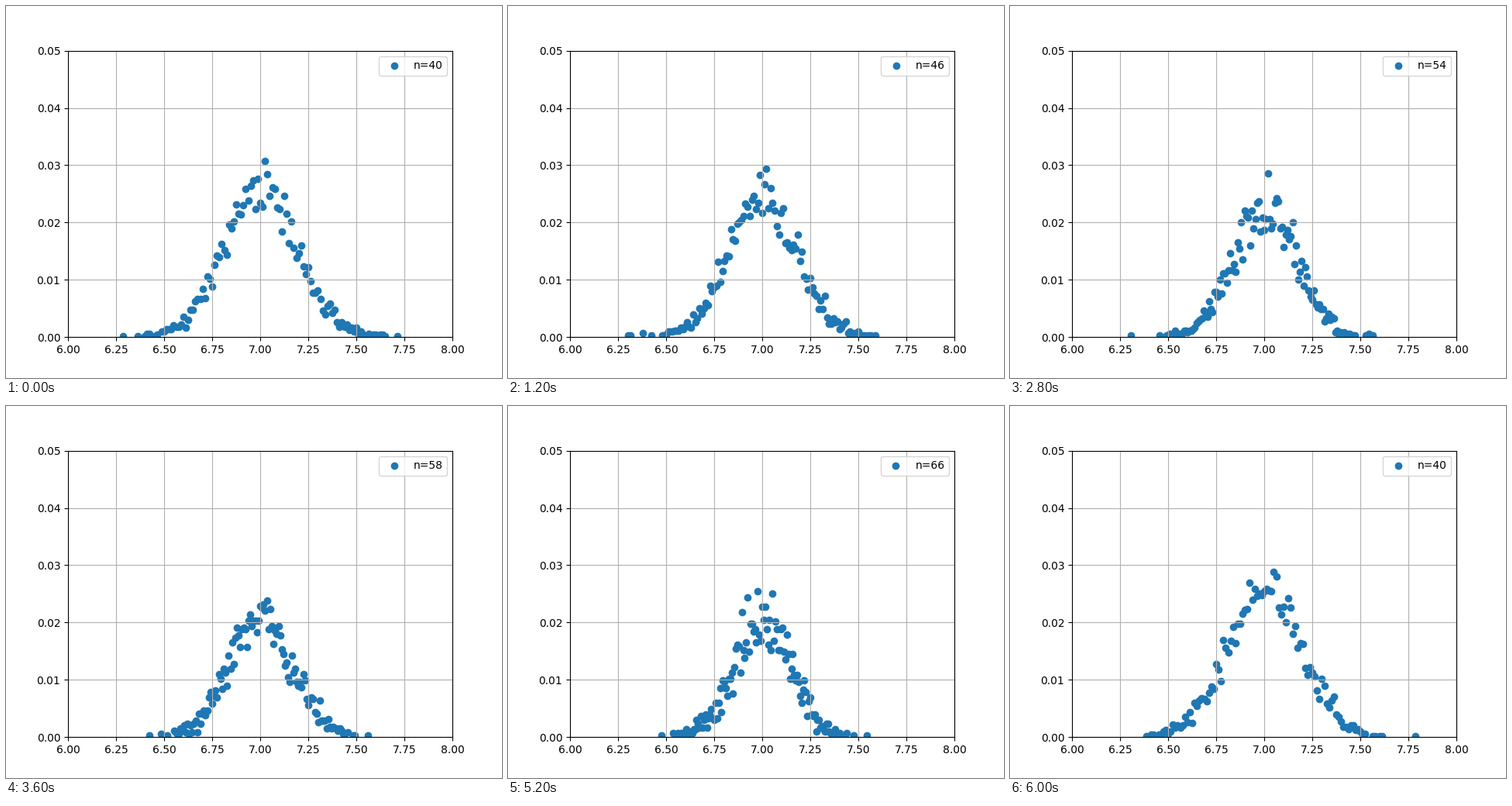
Recreate the animation shown at these times as a matplotlib script. Size 640 px wide and 480 px high, loop 6200 ms.

```python
import numpy as np
import matplotlib.pyplot as plt
from matplotlib.animation import FuncAnimation

FIRST_N, STEPS = 40, 30          # n runs 40..69, then starts over
FRAMES, INTERVAL = 31, 200
ROLLS = 200_000                  # pairs of dice shared out among the samples

fig, ax = plt.subplots(figsize=(6.4, 4.8), dpi=100)
ax.set_xlim(6, 8)
ax.set_ylim(0, 0.05)
ax.grid(True)
dots = ax.scatter([], [], color="C0", label=f"n={FIRST_N}")
label = ax.legend(loc="upper right").get_texts()[0]


def sample_means(n, seed):
    """Relative frequency of each mean of 2n dice, centred on 7."""
    rng = np.random.default_rng(seed)
    size = ROLLS // n
    sums = rng.integers(1, 7, (size, 2 * n), dtype=np.int16).sum(axis=1)
    values, counts = np.unique(sums, return_counts=True)
    return np.column_stack([3.5 + values / (2 * n), counts / size])


def update(i):
    n = FIRST_N + i % STEPS
    dots.set_offsets(sample_means(n, 700 + i))
    label.set_text(f"n={n}")
    return dots, label


anim = FuncAnimation(fig, update, frames=FRAMES, interval=INTERVAL,
                     repeat=True, blit=False)
plt.show()
```
